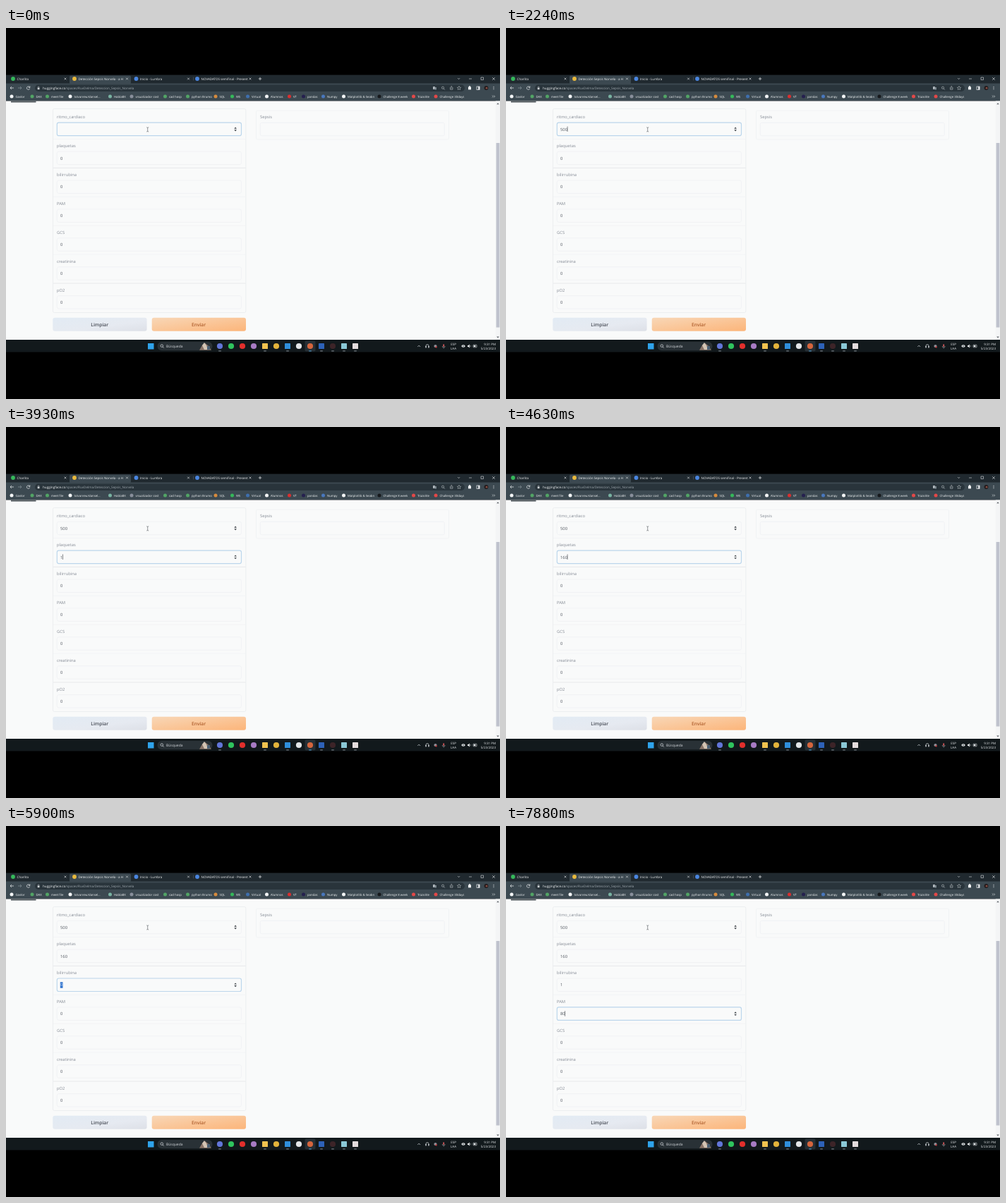
An HTML page for the animation above (8 s loop, 700 by 526 pixels).

```html
<!DOCTYPE html>
<html lang="es">
<head>
<meta charset="utf-8">
<title>Formulario de sepsis</title>
<style>
  html, body { margin: 0; width: 100%; height: 100%; overflow: hidden; background: #000; }
  svg { display: block; width: 700px; height: 526px; }
  text { font-family: "Open Sans", "Noto Sans", sans-serif; text-rendering: geometricPrecision; white-space: pre; }
</style>
</head>
<body>
<svg id="stage" viewBox="0 0 700 526">
  <defs>
    <linearGradient id="clear" x1="0" y1="0" x2="1" y2="1">
      <stop offset="0" stop-color="#e2ebf4"/><stop offset=".6" stop-color="#e6eaf1"/><stop offset="1" stop-color="#dde0e7"/>
    </linearGradient>
    <linearGradient id="send" x1="0" y1="0" x2="1" y2="1">
      <stop offset="0" stop-color="#f8d7b7"/><stop offset="1" stop-color="#fcb57a"/>
    </linearGradient>
  </defs>
</svg>
<script>
const NS = 'http://www.w3.org/2000/svg';
const stage = document.getElementById('stage');

function add(tag, attrs, parent = stage) {
  const el = document.createElementNS(NS, tag);
  for (const key in attrs) el.setAttribute(key, attrs[key]);
  return parent.appendChild(el);
}
const rect = (x, y, width, height, fill, extra = {}) =>
  add('rect', { x, y, width, height, fill, ...extra });
const dot = (cx, cy, r, fill) => add('circle', { cx, cy, r, fill });
const line = (d, stroke, width = 0.7) =>
  add('path', { d, stroke, fill: 'none', 'stroke-width': width });

// y is the vertical middle of the lettering
function label(str, x, y, size, fill, extra = {}) {
  const el = add('text', { x, y: y + size * 0.36, 'font-size': size, fill, ...extra });
  el.textContent = str;
  return el;
}
const cross = (x, y, r, color) =>
  line(`M${x - r} ${y - r}l${2 * r} ${2 * r}m0 ${-2 * r}l${-2 * r} ${2 * r}`, color, 0.6);

const STRIP = '#20292f', BAR = '#3c4951', FIELD = '#29343b';
const BRIGHT = { 'font-weight': 500 };

function drawTabs() {
  rect(0, 66.5, 700, 13, STRIP);
  rect(90, 67.5, 87, 12, BAR, { rx: 2 });
  const tabs = [
    [10, '#35b85a', 'Charlita', 84],
    [97, '#e9b93c', 'Detección Sepsis Norvela - a H', 171.5],
    [184.5, '#4a86e0', 'Inicio - Lumbra', 258.5],
    [271, '#4a86e0', 'NOVADATOS semifinal - Present', 346]
  ];
  for (const [x, color, title, close] of tabs) {
    dot(x, 72, 2.9, color);
    label(title, x + 5.6, 72, 4.5, '#f3f5f6', BRIGHT);
    cross(close, 72, 1.4, '#e4e7e9');
  }
  line('M265.5 69.5v5', '#56626a', 0.5);
  line('M357.8 72h4.4M360 69.8v4.4', '#eceef0');
  line('M640 71l1.6 1.6 1.6-1.6M656 72h4M673 70h3.5v3.5h-3.5z', '#d5d9dc', 0.6);
  cross(691, 72, 1.8, '#e4e7e9');
}

function drawToolbar() {
  rect(0, 78.5, 700, 25, BAR);
  line('M11 85H6M8 83l-2 2 2 2', '#eceff1');
  line('M17 85h5M20 83l2 2-2 2', '#8a959c');
  line('M33.6 84.2a2.2 2.2 0 1 0 .1 1.6M33.9 82.4v2h-2', '#eceff1');
  rect(41, 80.5, 609, 9.5, FIELD, { rx: 4.7 });
  rect(44.7, 84.6, 2.8, 2.6, '#d0d5d8');
  line('M45.2 84.7v-.8a.9.9 0 0 1 1.8 0v.8', '#d0d5d8', 0.5);

  const url = label('huggingface.co', 52, 85.3, 4.6, '#f3f5f6', BRIGHT);
  const path = add('tspan', { fill: '#a0a9af' }, url);
  path.textContent = '/spaces/RuvDelma/Deteccion_Sepsis_Norvela';

  rect(605, 83, 3, 4, '#adb5ba');
  rect(607.5, 84, 2.5, 3.5, '#7d888f');
  add('circle', { cx: 619, cy: 84.7, r: 1.6, fill: 'none', stroke: '#bac1c5', 'stroke-width': 0.6 });
  line('M620.2 86l1.5 1.5', '#bac1c5');
  line('M629.5 84v3.2h3.4V84M631.2 86v-3.6m-1 1l1-1 1 1', '#bac1c5', 0.6);
  line('M642 82.4l.8 1.7 1.9.2-1.4 1.3.4 1.9-1.7-.9-1.7.9.4-1.9-1.4-1.3 1.9-.2z', '#ccd2d5', 0.5);
  rect(655, 83.4, 4, 4, '#f3f5f6');
  dot(657, 83, 1, '#f3f5f6');
  rect(667, 83, 4, 4.4, 'none', { stroke: '#eef0f2', 'stroke-width': 0.7 });
  rect(669.2, 83, 2, 4.4, '#eef0f2');
  dot(680.5, 85, 2.9, '#211b1c');
  dot(681, 85.2, 1.4, '#844b42');
  for (const y of [83.2, 85, 86.8]) dot(691, y, 0.55, '#e6e9eb');

  const marks = [
    [8, 'Gavlor', '#f3f5f6'], [37, 'DAX', '#52a465'], [58.5, 'meet file', '#52a465'],
    [91, 'tolvanreu/dansel…', '#f3f5f6'], [147.5, 'HablaBX', '#79b3a2'],
    [178, 'visualizador cost', '#898f9b'], [225.5, 'cad hosp', '#52a465'],
    [257.5, 'python Brumo', '#52a465'], [297, 'SQL', '#d78b3d'], [320.5, 'WS', '#35b85a'],
    [342.5, 'Virtual', '#3e6fae'], [369.5, 'Alumnos', '#f3f5f6'], [401.5, 'VT', '#d92f2f'],
    [421.5, 'pandas', '#25204f'], [449.5, 'Numpy', '#4977bd'],
    [478.5, 'Matplotlib & Seabn', '#f3f5f6'], [529, 'Challenge 8 week', '#17191c'],
    [577.5, 'Trazolite', '#e34848'], [609, 'Challenge 30days', '#e34848']
  ];
  for (const [x, name, color] of marks) {
    dot(x, 97, 2.5, color);
    label(name, x + 5.4, 97, 4.3, '#f3f5f6', BRIGHT);
  }
  line('M689 95.5l1.5 1.5-1.5 1.5m2.3-3l1.5 1.5-1.5 1.5', '#e6e9eb', 0.6);
}

const INK = '#50565f', GREY = '#858b95', EDGE = '#eef0f2', RING = '#bcd6ec';
const rowY = i => 143.4 + i * 40.9;
const names = ['ritmo_cardiaco', 'plaquetas', 'bilirrubina', 'PAM', 'GCS', 'creatinina', 'pO2'];
const boxes = [], values = [], arrows = [];

function drawPage() {
  rect(0, 103.5, 700, 338.5, '#f9fafa');
  rect(7, 103.7, 35.5, 1.8, '#4b5359');
  rect(66.5, 114.5, 273.3, 289, '#f9fafa', { rx: 2, stroke: '#e9ebee', 'stroke-width': 0.8 });
  rect(354.5, 117, 273, 41, '#f9fafa', { rx: 2, stroke: '#eff1f3', 'stroke-width': 0.8 });
  label('Sepsis', 360, 126, 5.8, GREY);
  rect(360.3, 134.3, 261, 18.5, '#f9fafa', { rx: 2, stroke: EDGE, 'stroke-width': 0.7 });

  names.forEach((name, i) => {
    const y = rowY(i);
    if (i) line(`M67 ${y - 26.8}h272.5`, i === 2 || i === 6 ? '#e2e5e8' : '#f2f3f5', 0.8);
    label(name, 72, y - 17.3, 5.8, GREY);
    boxes.push(rect(72.3, y - 9.2, 261.2, 18.5, '#f9fafa', { rx: 2.5 }));
    values.push(label('0', 77, y + 0.2, 5.8, INK));
    arrows.push(add('path', { d: `M323.3 ${y - 0.7}l1.8-2.1 1.8 2.1zM323.3 ${y + 0.9}l1.8 2.1 1.8-2.1z`, fill: '#3d4247' }));
  });

  rect(66.3, 410.7, 133.3, 19, 'url(#clear)', { rx: 3 });
  rect(206.7, 410.7, 133.3, 19, 'url(#send)', { rx: 3 });
  const button = { 'font-weight': 600, 'text-anchor': 'middle' };
  label('Limpiar', 132.7, 420.3, 6.7, '#454a54', button);
  label('Enviar', 273, 420.3, 6.7, '#b0602f', button);

  rect(693.8, 103.5, 6.2, 338.5, '#f4f5f6');
  rect(694.6, 163, 4.8, 261.5, '#bfc2cd');
  add('path', { d: 'M695.2 108.2l1.8-2 1.8 2zM695.2 437.6l1.8 2 1.8-2z', fill: '#5c6066' });
}

function drawTaskbar() {
  rect(0, 442, 700, 17.5, '#12191c');
  rect(201, 447, 8.5, 8.5, '#2fa3ea');
  rect(214.5, 445, 78, 12.3, '#293136', { rx: 6 });
  add('circle', { cx: 220.8, cy: 450.6, r: 1.8, fill: 'none', stroke: '#dfe3e7', 'stroke-width': 0.7 });
  line('M222.1 452l1.6 1.6', '#dfe3e7');
  label('Búsqueda', 227, 451.2, 5, '#d3d7db');
  add('path', { d: 'M274 456.8l4-7 4-3 5 4 4 6z', fill: '#8a7468' });
  add('path', { d: 'M278 450l3-4 3 4 2 6h-5z', fill: '#d3c4b4' });
  rect(285, 451, 4, 5, '#4a6075');

  // x, colour, square?, window open?
  const apps = [
    [303, '#6275d8', 0, 1], [319, '#2fc45e', 0, 0], [335, '#e22f2c', 0, 0],
    [351, '#a77bc4', 0, 0], [367, '#f0c24f', 1, 1], [383, '#e2b33b', 0, 0],
    [399, '#2f8fdb', 1, 1], [415, '#e3e6e8', 0, 0], [431, '#d5653d', 0, 1],
    [447, '#2d62b8', 1, 1], [463, '#3c2428', 0, 1], [479, '#8bc8d6', 1, 1], [495, '#e4dcdd', 1, 1]
  ];
  for (const [x, color, square, open] of apps) {
    if (x === 431) rect(423.5, 443.5, 15, 15, '#262f35', { rx: 2 });
    if (square) rect(x - 4, 447, 8, 8, color, { rx: 0.6 });
    else dot(x, 451, 4.1, color);
    if (open) rect(x - 1.8, 457.5, 3.6, 0.9, x === 431 ? '#5ab4ec' : '#949ba4');
  }

  line('M583.3 452l1.9-1.9 1.9 1.9', '#dfe3e7');
  line('M595 452v-1.3a2 2 0 0 1 4 0v1.3', '#dfe3e7');
  rect(594.4, 451, 1.3, 2.4, '#dfe3e7');
  rect(598.3, 451, 1.3, 2.4, '#dfe3e7');
  dot(608.5, 451, 2.1, '#8e8f97');
  dot(609.6, 452.4, 1.1, '#d2383a');
  rect(619.3, 448.2, 1.8, 3.7, '#d4595b', { rx: 0.9 });
  line('M618.2 451a2 2 0 0 0 4 0M620.2 453v1.4', '#c8cdd2', 0.5);
  const mid = { 'text-anchor': 'middle' }, end = { 'text-anchor': 'end' };
  label('ESP', 634, 448.5, 4.5, '#e6e9ec', mid);
  label('LAA', 634, 454.3, 4.5, '#e6e9ec', mid);
  add('ellipse', { cx: 648, cy: 451, rx: 2.6, ry: 1.7, fill: '#e6e9ec' });
  dot(648, 451, 0.8, '#12191c');
  add('path', { d: 'M654 450h1.2l1.7-1.6v5.2l-1.7-1.6H654z', fill: '#e6e9ec' });
  line('M658 449.6q1.1 1.4 0 2.8', '#e6e9ec', 0.5);
  rect(662, 449.2, 5, 3.6, 'none', { stroke: '#e6e9ec', 'stroke-width': 0.6, rx: 0.6 });
  rect(662.8, 450, 2.6, 2, '#e6e9ec');
  label('9:31 PM', 694, 448.5, 4.5, '#e6e9ec', end);
  label('5/23/2023', 694, 454.3, 4.5, '#e6e9ec', end);
}

drawTabs();
drawToolbar();
drawPage();
drawTaskbar();

const picked = rect(76.8, 0, 3.7, 8.4, '#2d70cc');
const pickedText = label('0', 77, 0, 5.8, '#cfe4fb');
const caret = rect(0, 0, 0.6, 7.4, '#33373d');
line('M199.2 140.8q1.5 0 1.5.8v4.6q0 .8-1.5.8m3-6.2q-1.5 0-1.5.8m1.5 5.4q-1.5 0-1.5-.8', '#50555a', 0.6);

// start time, focused field, its text, caret state
const OFF = 0, ON = 1, SELECT = 2;
const LOOP = 8000, DIGIT = 5.8 * 0.572;
const steps = [
  [0, 0, '', OFF], [280, 0, '', ON], [840, 0, '', OFF], [1400, 0, '', ON],
  [1820, 0, '5', ON], [1960, 0, '50', ON], [2100, 0, '500', ON], [2520, 0, '500', OFF],
  [2800, 1, '0', SELECT],
  [3930, 1, '1', ON], [4070, 1, '16', ON], [4210, 1, '160', ON],
  [4770, 2, '0', SELECT], [6610, 2, '1', ON],
  [6890, 3, '0', SELECT], [7740, 3, '8', ON], [7880, 3, '80', ON]
];

function show(index) {
  const [, focus, text, state] = steps[index];
  const y = rowY(focus);
  const visible = (el, on) => el.setAttribute('visibility', on ? 'visible' : 'hidden');
  const typed = names.map(() => '0');
  for (let k = 0; k <= index; k++) typed[steps[k][1]] = steps[k][2];
  names.forEach((_, i) => {
    const on = i === focus;
    values[i].textContent = typed[i];
    boxes[i].setAttribute('stroke', on ? RING : EDGE);
    boxes[i].setAttribute('stroke-width', on ? 1.2 : 0.7);
    visible(arrows[i], on || i === 0);
  });
  picked.setAttribute('y', y - 3.9);
  pickedText.setAttribute('y', y + 0.2 + 5.8 * 0.36);
  visible(picked, state === SELECT);
  visible(pickedText, state === SELECT);
  caret.setAttribute('x', 76.8 + text.length * DIGIT);
  caret.setAttribute('y', y - 3.8);
  visible(caret, state === ON);
}

let current = -1;
const origin = performance.now();
function tick(now) {
  const t = Math.max(0, now - origin) % LOOP;
  let index = 0;
  while (index + 1 < steps.length && steps[index + 1][0] <= t) index++;
  if (index !== current) show(current = index);
  requestAnimationFrame(tick);
}
tick(origin);
</script>
</body>
</html>
```
